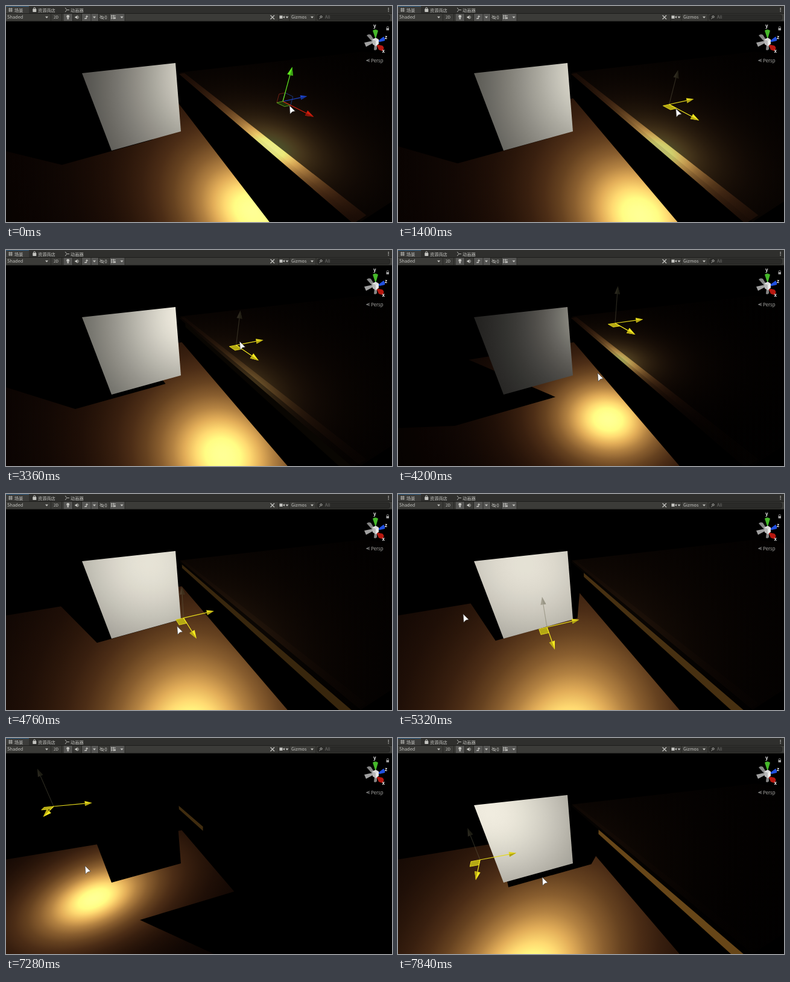
Recreate the animation shown at these times as an HTML page. Size 640x360 px, loop 8 s.

```html
<!DOCTYPE html>
<html lang="zh">
<head>
<meta charset="utf-8">
<title>Light drag</title>
<style>
html, body { margin: 0; width: 100%; height: 100%; overflow: hidden; background: #000; }
svg { display: block; width: 100vw; height: 100vh; }
text { font-family: "Noto Sans CJK SC", "Noto Sans CJK", "Noto Sans", sans-serif; fill: #c4c4c0; }
.axis { font-size: 8px; font-weight: bold; fill: #eee; }
</style>
</head>
<body>
<svg viewBox="0 0 640 360">
  <defs>
    <radialGradient id="ground" gradientUnits="userSpaceOnUse" cx="0" cy="0" r="1"></radialGradient>
    <radialGradient id="ledge" gradientUnits="userSpaceOnUse" cx="0" cy="0" r="1"></radialGradient>
    <radialGradient id="face" gradientUnits="userSpaceOnUse" cx="0" cy="0" r="1"></radialGradient>
  </defs>
  <rect width="640" height="360"/>
  <polygon id="floor" fill="url(#ground)"/>
  <polygon id="shadow"/>
  <polygon id="farFloor" fill="url(#ledge)"/>
  <polygon id="curb" fill="url(#ledge)"/>
  <polygon id="curbSide" fill="#76501c"/>
  <polygon id="board" fill="url(#face)"/>
  <g id="handles"></g>

  <g id="bar">
    <rect width="640" height="12.500" fill="#2f2f2d"/>
    <rect width="38" height="12.500" fill="#3c3c3a"/>
    <rect width="38" height="1" fill="#2c5d87"/>
    <rect y="12.500" width="640" height="13" fill="#3b3b38"/>
    <path d="M0 12.500H640M0 25.300H640" stroke="#1c1c1a" stroke-width=".8"/>
    <path d="M96 13h14v12h-14zM126 13h27v12h-27zM172 13h25v12h-25z" fill="#565654"/>
    <path d="M74.500 13v12M92.500 13v12M110.500 13v12M125.500 13v12M141 13v12M153.500 13v12M172 13v12M197 13v12M452 13v12M470 13v12M514 13v12" stroke="#222220" stroke-width=".8"/>
    <rect x="516.500" y="14.500" width="120" height="9" rx="3" fill="#2a2a28" stroke="#1e1e1c" stroke-width=".7"/>
    <g font-size="7.200">
      <text x="14" y="9.500">场景</text>
      <text x="53" y="9.500">资源商店</text>
      <text x="107" y="9.500">动画器</text>
    </g>
    <g font-size="7.400">
      <text x="2" y="21.300">Shaded</text>
      <text x="79" y="21.300" font-size="6.500">2D</text>
      <text x="163.500" y="21.500">0</text>
      <text x="473" y="21.300">Gizmos</text>
      <text x="529" y="21.300" font-size="7" opacity=".5">All</text>
    </g>
    <g fill="none" stroke="#c4c4c0" stroke-width=".9">
      <path d="M6 3v7M9 3v7M4 5h7M4 8h7"/>
      <path d="M45.700 5v-1a1.500 1.500 0 0 1 3 0v1"/>
      <path d="M98 3l3 3.500h4M101 6.500l-3 3.500"/>
      <path d="M119.500 16.500q2 2 0 4.500"/>
      <path d="M155.500 19q3.500-4 7 0q-3.500 4-7 0M156 15.500l6 7"/>
      <path d="M175 15v7M178.500 15v7M174 16.500h8M174 20h5"/>
      <path d="M438.500 15.500l6.500 6.500M445 15.500l-6.500 6.500" stroke-width="1.300"/>
      <circle cx="522.500" cy="18" r="1.600"/><path d="M521 20l-1.500 1.500"/>
    </g>
    <g fill="#c4c4c0">
      <rect x="44.300" y="4.800" width="6" height="5.200" rx=".7"/>
      <circle cx="102.700" cy="17.500" r="2.400"/><rect x="101.500" y="20" width="2.400" height="2.200"/>
      <path d="M114.500 17.500h1.500l2.500-2v6.500l-2.500-2h-1.500z"/>
      <path d="M130 20.500l4-1.500v2.500h-4zM134 15l.7 1.800l1.800.7l-1.800.7l-.7 1.800l-.7-1.800l-1.800-.7l1.800-.7z"/>
      <circle cx="180.500" cy="20" r="1.600"/>
      <path d="M453.500 16h5v5h-5zM459 18.500l3-2v4z"/>
      <path d="M65 17.500h5l-2.500 3zM144 17.500h5l-2.500 3zM189.500 17.500h5l-2.500 3zM463.500 17.500h5l-2.500 3zM505 17.500h5l-2.500 3z"/>
      <path d="M633.500 3h1.400v1.400h-1.400zM633.500 5.600h1.400v1.400h-1.400zM633.500 8.200h1.400v1.400h-1.400z"/>
    </g>
  </g>

  <g id="compass">
    <path d="M598 49Q601 46 605 48L610 56L606 58Z" fill="#858585"/>
    <path d="M594 61L597 68L610 61L608 58Z" fill="#a0a0a0"/>
    <path d="M611 64L610 73Q613 75 615 72L615 63Z" fill="#858585"/>
    <path d="M608 41Q612 37.500 617 41L613.500 53H612Z" fill="#46b82a"/>
    <path d="M617 58L626 51Q629 54 628 58L619 60Z" fill="#2050e0"/>
    <path d="M614 64L624 66Q629 70 624 75L618 73Z" fill="#b81810"/>
    <path d="M607 56L613 53L618 56V63L613 67L608 64Z" fill="#b9b9b9"/>
    <path d="M607 56L613 58L618 56L613 53Z" fill="#dcdcdc"/>
    <path d="M613 58V67L618 63V56Z" fill="#e8e8e8"/>
    <text class="axis" x="609" y="36">y</text>
    <text class="axis" x="628" y="55">z</text>
    <text class="axis" x="623.500" y="77.500">x</text>
    <rect x="630.500" y="37" width="4.500" height="3.500" fill="#a8a8a8"/>
    <path d="M631.300 37v-1.300a1.500 1.500 0 0 1 3 0v1.300" fill="none" stroke="#a8a8a8" stroke-width=".8"/>
    <path d="M603 88.500L597.500 90.800L603 93M598 90.800h5" fill="none" stroke="#999" stroke-width=".8"/>
    <text x="605" y="93.500" font-size="7.800" opacity=".85">Persp</text>
  </g>
  <path id="cursor" d="M0 0L1 14L4.500 10.300L9.300 9.300Z" fill="#fff" stroke="#444" stroke-width=".7"/>
</svg>
<script>
const LOOP = 8000, STEP = 280;
const $ = id => document.getElementById(id);
const set = (id, attrs) => { for (const k in attrs) $(id).setAttribute(k, attrs[k]); };
const clamp = (v, lo = 0, hi = 1) => Math.min(hi, Math.max(lo, v));

// Camera at the world origin: x points to the viewer, y up, z right.
const FOCAL = 290, CX = 320, CY = 192.5, PITCH = 31.2 * Math.PI / 180, YAW = 23.15 * Math.PI / 180;
const sp = Math.sin(PITCH), cp = Math.cos(PITCH), sy = Math.sin(YAW), cy = Math.cos(YAW);

const forward = ([x, , z]) => sy * z - cy * x;
const depth = p => forward(p) * cp - p[1] * sp;
function project(p) {
  const k = FOCAL / depth(p);
  return [CX + k * (cy * p[2] + sy * p[0]), CY - k * (p[1] * cp + forward(p) * sp)];
}
function ray(px, py) {
  const r = px - CX, d = py - CY, fw = FOCAL * cp - d * sp;
  return [sy * r - cy * fw, -d * cp - FOCAL * sp, cy * r + sy * fw];
}
const reach = (v, axis, value) => v.map(c => c * value / v[axis]);
const mix = (a, b, u) => a.map((v, i) => v + (b[i] - v) * u);

// Projects a polygon after cutting off what lies behind the camera.
function outline(pts, near = .08) {
  const out = [];
  pts.forEach((a, i) => {
    const b = pts[(i + 1) % pts.length], da = depth(a) - near, db = depth(b) - near;
    if (da > 0) out.push(project(a));
    if (da * db < 0) out.push(project(mix(a, b, da / (da - db))));
  });
  return out.join(" ");
}
const slab = (x0, x1, y, z0, z1) => outline([[x0, y, z0], [x0, y, z1], [x1, y, z1], [x1, y, z0]]);

const FLOOR = -1, LAMP = -.28, BOARD = -1;
const BACK = -2.2, FLOOR_EDGE = .676;
const CURB = { y: -.51, foot: -.545, z0: .514, z1: .576, far: -1.73, near: -.08 };
const board = [[126, 112], [281, 95], [290, 209], [175, 241]];
const [right, left] = board.slice(2).map(p => reach(ray(...p), 0, BOARD));

// The lamp on screen while it is dragged: time, x, y.
const drag = [
  [0, 459, 159], [2520, 442, 168], [2800, 396, 183], [4200, 360, 122], [4480, 318, 199],
  [5320, 247, 222], [5600, 95, 194], [6160, 94, 169], [6440, 57, 111],
  [7280, 79, 114], [7560, 118, 207], [7840, 136, 203], [8120, 226, 226]
];
function dragAt(t) {
  const i = Math.max(1, drag.findIndex(k => k[0] >= t));
  const a = drag[i - 1], b = drag[i];
  return mix(a, b, (t - a[0]) / (b[0] - a[0])).slice(1);
}

function gradient(id, shade, size) {
  let s = "";
  for (let i = 0; i <= 20; i++) {
    const u = (i / 20) ** 1.5;
    s += `<stop offset="${u}" stop-color="rgb(${shade(u * size).map(v => Math.round(clamp(v, 0, 255)))})"/>`;
  }
  $(id).innerHTML = s;
}
function warm(r) {
  const e = (1 + (r / .38) ** 2) ** -1.5;
  return [340 * e ** .9, 285 * e ** 1.1, 150 * e ** 1.15];
}
// Lays a gradient on the plane spanned by two world axes.
function lay(id, foot, a, b, size) {
  const o = project(foot), eps = .01;
  const [u, v] = [a, b].map(axis => {
    const q = foot.slice();
    q[axis] += eps;
    return project(q).map((c, i) => (c - o[i]) / eps * size);
  });
  set(id, { gradientTransform: `matrix(${[...u, ...v, ...o]})` });
}

function arrow(a, b, color, dark, size) {
  const dx = b[0] - a[0], dy = b[1] - a[1], len = Math.hypot(dx, dy);
  const ux = dx / len, uy = dy / len, w = size * .35;
  const x = b[0] - ux * size, y = b[1] - uy * size;
  const l = `${x - uy * w},${y + ux * w}`, r = `${x + uy * w},${y - ux * w}`;
  return `<path d="M${a}L${x},${y}" stroke="${color}" stroke-width="1.2"/>` +
    `<path d="M${b}L${l}L${r}Z" fill="${color}"/><path d="M${b}L${l}L${x},${y}Z" fill="${dark}"/>`;
}
function patch(o, p, m, q, n, fill, line) {
  const at = (m, n) => o.map((c, i) => c + m * (p[i] - c) + n * (q[i] - c));
  return `<polygon points="${at(0, 0)} ${at(m, 0)} ${at(m, n)} ${at(0, n)}" fill="${fill}" stroke="${line}" stroke-width=".9"/>`;
}
function handles(lamp, idle) {
  const o = project(lamp), size = .195 * depth(lamp);
  const [front, up, side] = [0, 1, 2].map(axis => project(lamp.map((c, i) => i === axis ? c + size : c)));
  const s = .25;
  if (idle) {
    return patch(o, side, -s, up, s, "none", "#7c2416") + patch(o, front, s, up, s, "none", "#1f3f86") +
      patch(o, side, -s, front, s, "#1d3008", "#5fae20") +
      arrow(o, side, "#1c44c8", "#143090", 11) + arrow(o, front, "#d01c0c", "#8c1408", 14) +
      arrow(o, up, "#62ec20", "#3ca414", 14);
  }
  return `<g opacity=".4">${arrow(o, up, "#66624a", "#48462e", 13)}</g>` +
    patch(o, side, -s, front, s, "#b4a814", "#e6da1c") +
    arrow(o, side, "#e4d81c", "#b0a214", 12) + arrow(o, front, "#f6ea20", "#beae14", 14);
}

function lightScene(lamp) {
  const [lx, ly, lz] = lamp, behind = lx < BOARD;

  lay("ground", [lx, FLOOR, lz], 0, 2, 1.8);
  const lit = Math.min(FLOOR_EDGE, lz + (.55 - lz) * 3.1);
  set("floor", { points: slab(BACK, 0, FLOOR, -4, lit) });

  const cast = (p, far) => {
    const s = mix(lamp, p, (FLOOR - ly) / (p[1] - ly));
    return [s[0] + far * (s[0] - lx), FLOOR, s[2] + far * (s[2] - lz)];
  };
  set("shadow", { points: outline([cast(left, 0), cast(right, 0), cast(right, 12), cast(left, 12)]) });

  lay("ledge", [lx, CURB.y, lz], 0, 2, 1.1);
  set("farFloor", { opacity: behind ? 0 : .3 });
  set("curb", { opacity: behind ? 0 : clamp((lz - .3) * 3.8, .12, .9) });

  const span = right[2] - lz;
  const hit = span > 0 ? lx + (BOARD - lx) * (CURB.z0 - lz) / span : CURB.far;
  const cut = clamp(hit + (behind ? -.2 : .2), CURB.far, CURB.near);
  const [x0, x1] = behind ? [CURB.far, cut] : [cut, CURB.near];
  const { y, foot, z0 } = CURB;
  set("curbSide", {
    points: outline([[x0, y, z0], [x1, y, z0], [x1, foot, z0], [x0, foot, z0]]),
    opacity: clamp((.42 - lz) * 1.6, 0, behind ? .55 : .9)
  });

  const gap = Math.max(0, lx - BOARD), peak = 280 * Math.min(1, .35 + 1.3 * gap);
  gradient("face", r => {
    const d = Math.hypot(r, gap) || 1, e = peak * gap / d / (1 + .6 * d * d);
    return [e, e * .985, e * .93];
  }, 1.2);
  lay("face", [BOARD, ly, lz], 2, 1, 1.2);
}

let shown = -1;
function draw(ms) {
  const t = Math.floor(ms % LOOP / STEP) * STEP;
  if (t === shown) return;
  shown = t;
  const lamp = reach(ray(...dragAt(t)), 1, LAMP);
  lightScene(lamp);
  $("handles").innerHTML = handles(lamp, t < STEP);
  // The lamp trails the pointer by one step.
  const [x, y] = dragAt(t + STEP);
  set("cursor", { transform: `translate(${x + 13} ${y + 6})` });
}

gradient("ground", warm, 1.8);
gradient("ledge", warm, 1.8);
set("board", { points: board.join(" ") });
set("farFloor", { points: slab(-1.9, CURB.near, CURB.foot, CURB.z1, 4) });
set("curb", { points: slab(CURB.far, CURB.near, CURB.y, CURB.z0, CURB.z1) });

const start = performance.now();
function tick() {
  draw(performance.now() - start);
  requestAnimationFrame(tick);
}
tick();
</script>
</body>
</html>
```
